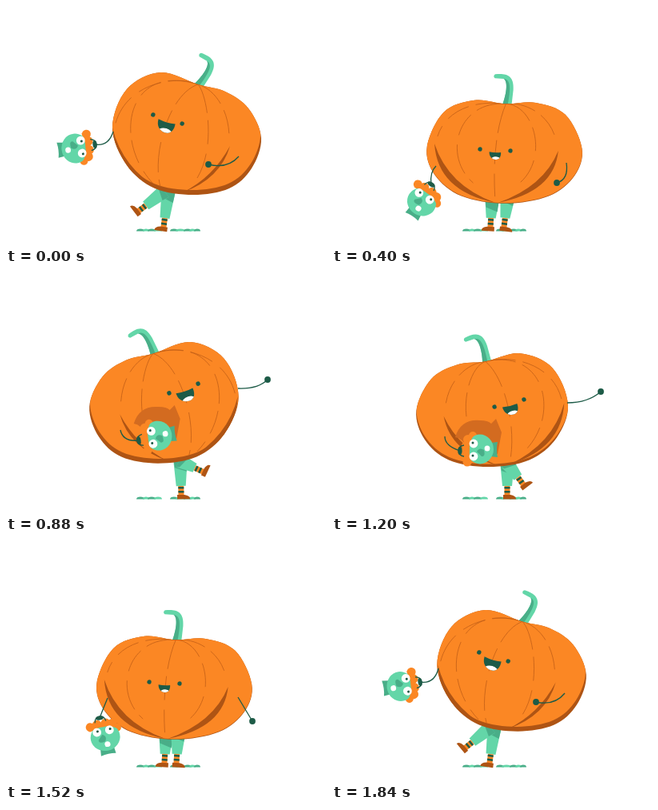
Animation of 400 by 300 pixels, one loop 1.92 s. Source, as an HTML page with a canvas:

```html
<!DOCTYPE html>
<html lang="en">
<head>
<meta charset="utf-8">
<title>Pumpkin dance</title>
<style>
html, body { margin: 0; width: 100%; height: 100%; overflow: hidden; background: #fff; }
canvas { display: block; }
</style>
</head>
<body>
<canvas id="stage" width="400" height="300"></canvas>
<script>
const ctx = document.getElementById('stage').getContext('2d');
const LOOP = 1920, STEP = 80, AXIS = 212;
const ORANGE = '#fb8724', RUST = '#ae5414', MINT = '#63d6a8', SAGE = '#49ae88', PINE = '#1d5b47';
const TIMES = [0, 400, 720, 880, 1200, 1520, 1840];

// Periodic monotone cubic through one value per key time
function track(...v) {
  const n = v.length;
  const time = i => TIMES[(i + n) % n] + LOOP * Math.floor(i / n);
  const slope = i => (v[(i + 1 + n) % n] - v[(i + n) % n]) / (time(i + 1) - time(i));
  const tangent = i => {
    const a = slope(i - 1), b = slope(i);
    return a * b <= 0 ? 0 : 2 * a * b / (a + b);
  };
  return t => {
    let i = n - 1;
    while (t < TIMES[i]) i--;
    const h = time(i + 1) - time(i), u = (t - time(i)) / h, w = 1 - u;
    return v[i] * w * w * (1 + 2 * u) + v[(i + 1) % n] * u * u * (3 - 2 * u)
      + h * u * w * (w * tangent(i) - u * tangent(i + 1));
  };
}

const rightArm = [
  track(291, 293, 295, 290, 294, 290, 291), track(188, 196, 161, 143, 161, 194, 189),
  track(277, 296, 312, 315, 320, 299, 278), track(204, 217, 169, 144, 161, 209, 205),
  track(253, 281, 330, 327, 336, 308, 255), track(198, 221, 169, 132, 147, 224, 200)];
const leftArm = [
  track(134, 130, 142, 143, 141, 127, 133), track(157, 200, 201, 195, 203, 195, 158),
  track(128, 122, 143, 146, 141, 122, 128), track(176, 208, 218, 210, 215, 207, 178),
  track(111, 124, 161, 166, 160, 117, 110), track(173, 223, 219, 208, 221, 220, 175)];
// hip x, hip y, ankle x, ankle y, toe direction
const leftLeg = [
  track(203, 200, 224, 220, 221, 200, 203), track(232, 244, 237, 235, 239, 244, 232),
  track(197, 198, 243, 246, 239, 198, 197), track(276, 276, 256, 247, 263, 276, 276),
  track(-1, -1, 1, 1, 1, -1, -1)];
const rightLeg = [
  track(195, 219, 219, 218, 219, 215, 195), track(234, 244, 236, 234, 238, 244, 234),
  track(166, 215, 219, 219, 219, 213, 167), track(256, 276, 276, 276, 276, 276, 257),
  track(-1, 1, 1, 1, 1, 1, -1)];
const face = [
  track(202, 204, 223.5, 222, 221.5, 198, 202), track(141.5, 180, 159.5, 143, 161.5, 176, 143.5),
  track(17, 3, -14, -18, -14, 3, 17), track(1, .66, .84, 1, .86, .66, 1)];
const headTurn = track(83, 33, -76, -99, -90, -12, 82);
const shadowAlpha = track(0, 0, 1, 1, 1, 0, 0);

// Pumpkin geometry: upright, then leaning to the right
const SKIN = [
  [212,126, 250,123, 288,137, 309.5,180, 301,213, 268,239, 212,248.5, 156,239, 123,213, 114.5,180, 136,137, 174,123],
  [241,98, 275,107, 304,128, 320,165, 308,203, 280,228, 235,236, 187,228, 152,199, 134,152, 152,104, 194,83]];
const CREASES = [
  [[180,122, 148,135, 138,165], [215,86, 150,95, 137,150]],
  [[165,125, 145,190, 182,221], [150,70, 135,170, 185,222]],
  [[211,160, 211,200, 212,240], [205,110, 183,185, 194,226]],
  [[259,125, 279,190, 242,221], [252,110, 264,175, 240,215]],
  [[244,122, 276,135, 286,165], [262,104, 280,130, 280,165]]];
// start, outer control, end, inner control
const FOLDS = [
  [[134,175, 138,235, 212,248, 152,228], [134,152, 136,206, 195,231, 146,202]],
  [[290,182, 286,235, 212,248, 272,228], [281,175, 269,216, 222,233, 260,214]]];

const mix = ([a, b], q) => a.map((v, i) => v + (b[i] - v) * q);

function at(x, y, deg, draw) {
  ctx.save();
  ctx.translate(x, y);
  ctx.rotate(deg * Math.PI / 180);
  draw();
  ctx.restore();
}
function fill(d, color) {
  ctx.fillStyle = color;
  ctx.fill(new Path2D(d));
}
function oval(x, y, rx, ry, color) {
  ctx.fillStyle = color;
  ctx.beginPath();
  ctx.ellipse(x, y, rx, ry, 0, 0, 7);
  ctx.fill();
}

function smoothLoop(p) {
  const n = p.length / 2, path = new Path2D();
  const pt = (i, k) => p[(i + n) % n * 2 + k];
  const ctrl = (i, sign, k) => pt(i, k) + sign * (pt(i + 1, k) - pt(i - 1, k)) / 6;
  path.moveTo(p[0], p[1]);
  for (let i = 0; i < n; i++)
    path.bezierCurveTo(ctrl(i, 1, 0), ctrl(i, 1, 1), ctrl(i + 1, -1, 0), ctrl(i + 1, -1, 1), pt(i + 1, 0), pt(i + 1, 1));
  return path;
}

function drawGrass() {
  for (const [x, r, c] of [[168, 5, SAGE], [175, 4, MINT], [182, 5, SAGE], [190, 5, MINT],
    [210, 5, SAGE], [218, 6, MINT], [227, 5, SAGE], [233, 4, MINT], [239, 4, SAGE]])
    fill(`M${x - r} 281.5Q${x - r} 278.5 ${x} 278.5T${x + r} 281.5Z`, c);
}

function drawLeg(leg, t, shade) {
  const [hx, hy, ax, ay, toe] = leg.map(f => f(t));
  const len = Math.hypot(ax - hx, ay - hy), turn = Math.atan2(hx - ax, ay - hy) * 180 / Math.PI;
  at(ax, ay, turn, () => {
    fill(`M-9 ${-len - 4}H9L6 -11H-6Z`, MINT);
    fill(`M-9 ${-len - 4}H9L7.5 ${-len + shade}L-7 ${-len + shade - 5}Z`, SAGE);
    fill('M-3.5 -11H3.5V2H-3.5Z', ORANGE);
    fill('M-3.5 -10H3.5V-7.5H-3.5ZM-3.5 -5H3.5V-2.5H-3.5Z', PINE);
    ctx.scale(toe, 1);
    fill('M-5 5.5V0H4Q11 1 11 5.5Z', RUST);
  });
}

function drawStem(x, y, turn) {
  at(x, y, turn, () => {
    fill('M-16 -36C-4 -38 8 -38 8 -18L7 4L-5 4C0 -12 1 -28 -5 -31L-16 -31Q-19 -33.5 -16 -36Z', MINT);
    fill('M-5 4C0 -12 1 -28 -5 -31C4 -31 5 -20 2 4Z', SAGE);
  });
}

function drawPumpkin(q, side, shift) {
  const p = mix(SKIN, q), skin = smoothLoop(p);
  ctx.save();
  if (side < 0) { ctx.translate(2 * AXIS, 0); ctx.scale(-1, 1); }
  ctx.fillStyle = RUST;
  ctx.fill(skin);
  ctx.clip(skin);
  ctx.translate(-q, -6 * q);
  ctx.fillStyle = ORANGE;
  ctx.fill(skin);
  ctx.translate(q + shift, 6 * q);
  for (const fold of FOLDS) {
    const [x, y, ox, oy, ex, ey, ix, iy] = mix(fold, q);
    fill(`M${x} ${y}Q${ox} ${oy} ${ex} ${ey}Q${ix} ${iy} ${x} ${y}`, RUST);
  }
  ctx.strokeStyle = '#c25f17';
  ctx.lineWidth = .8;
  ctx.setLineDash([38, 9, 30, 12]);
  for (const crease of CREASES) {
    ctx.beginPath();
    ctx.moveTo(p[0] - shift, p[1]);
    ctx.bezierCurveTo(...mix(crease, q));
    ctx.stroke();
  }
  ctx.restore();
}

function drawFace(t) {
  const [x, y, turn, size] = face.map(f => f(t));
  at(x, y, turn, () => {
    oval(-19, 0, 2.7, 2.7, PINE);
    oval(19, 0, 2.7, 2.7, PINE);
    ctx.translate(0, 2);
    ctx.scale(size, size);
    const mouth = 'M-11 1Q0 3 11 1C12 10 8 15 2 15C-5 15 -11 10 -11 1Z';
    fill(mouth, PINE);
    ctx.clip(new Path2D(mouth));
    oval(2, 15, 9, 5.5, '#fff');
  });
}

function drawArm([x, y, cx, cy, hx, hy]) {
  ctx.strokeStyle = PINE;
  ctx.lineWidth = 1.3;
  ctx.stroke(new Path2D(`M${x} ${y}Q${cx} ${cy} ${hx} ${hy}`));
}

function drawHead(x, y, turn) {
  at(x, y, turn, () => {
    for (const [hx, hy, r] of [[-14, 9, 5.5], [-5, 8, 6], [6, 8, 6], [14, 10, 6], [19, 16, 5]])
      oval(hx, hy, r, r, ORANGE);
    fill('M-7 38H10L11 47Q2 45 -8 47Z', SAGE);
    oval(2, 25, 18.5, 17, MINT);
    fill('M-16 15Q-10 4 4 7Q17 8 21 19Q12 11 2 12Q-8 11 -16 15Z', ORANGE);
    fill('M-1 21Q5 24 1 30Q-8 32 -7 27Z', SAGE);
    for (const ex of [-7, 9]) {
      oval(ex, 17, 5.4, 5.4, '#fff');
      oval(ex + 1, 16, 1.5, 1.5, PINE);
    }
    oval(3, 34, 3.6, 3.4, '#fff');
    ctx.strokeStyle = PINE;
    ctx.lineWidth = 1.3;
    ctx.stroke(new Path2D('M-7 5Q-6 -2 0 -2T7 5'));
    oval(0, 0, 5, 2.6, PINE);
  });
}

function drawHeadShadow(x, y, alpha, skin) {
  ctx.save();
  ctx.clip(skin);
  ctx.globalAlpha = Math.max(0, alpha);
  fill(`M${x - 31} ${y - 17}Q${x - 24} ${y - 40} ${x} ${y - 38}Q${x + 10} ${y - 38} ${x + 14} ${y - 34}`
    + `L${x + 20} ${y - 40}L${x + 27} ${y - 23}L${x + 22} ${y + 4}L${x - 14} ${y - 2}Q${x - 22} ${y - 16} ${x - 31} ${y - 17}Z`, '#d36b20');
  ctx.restore();
}

function draw(t) {
  const angle = Math.PI * t / 960, lean = Math.cos(angle), size = Math.abs(lean);
  const side = lean < 0 ? -1 : 1, q = size ** 1.5;
  const sway = 2.7 * Math.sin(angle) - 1;
  const shift = -36 * size * (1 - size * size) ** 3;
  const dip = mix(SKIN, q);

  ctx.clearRect(0, 0, 400, 300);
  drawGrass();
  const legs = [leftLeg, rightLeg];
  if (lean < 0) legs.reverse();
  legs.forEach((leg, i) => drawLeg(leg, t, i ? 5 : 13));

  ctx.save();
  ctx.translate(sway, 0);
  drawStem(AXIS + side * (dip[0] - AXIS), dip[1], 30 * side * q);
  drawPumpkin(q, side, shift);
  const skin = smoothLoop(dip.map((v, i) => i % 2 ? v : AXIS + side * (v - AXIS)));
  ctx.restore();

  drawFace(t);
  const right = rightArm.map(f => f(t)), left = leftArm.map(f => f(t));
  drawArm(right);
  oval(right[4], right[5], 3.9, 3.9, PINE);

  const turn = headTurn(t), rad = turn * Math.PI / 180;
  const [hx, hy] = left.slice(4);
  drawHeadShadow(hx - 25 * Math.sin(rad), hy + 25 * Math.cos(rad), shadowAlpha(t), skin);
  drawArm(left);
  drawHead(hx, hy, turn);
}

const start = performance.now();
function tick() {
  const t = (performance.now() - start) % LOOP;
  draw(Math.floor(t / STEP) * STEP);
  requestAnimationFrame(tick);
}
tick();
</script>
</body>
</html>
```
